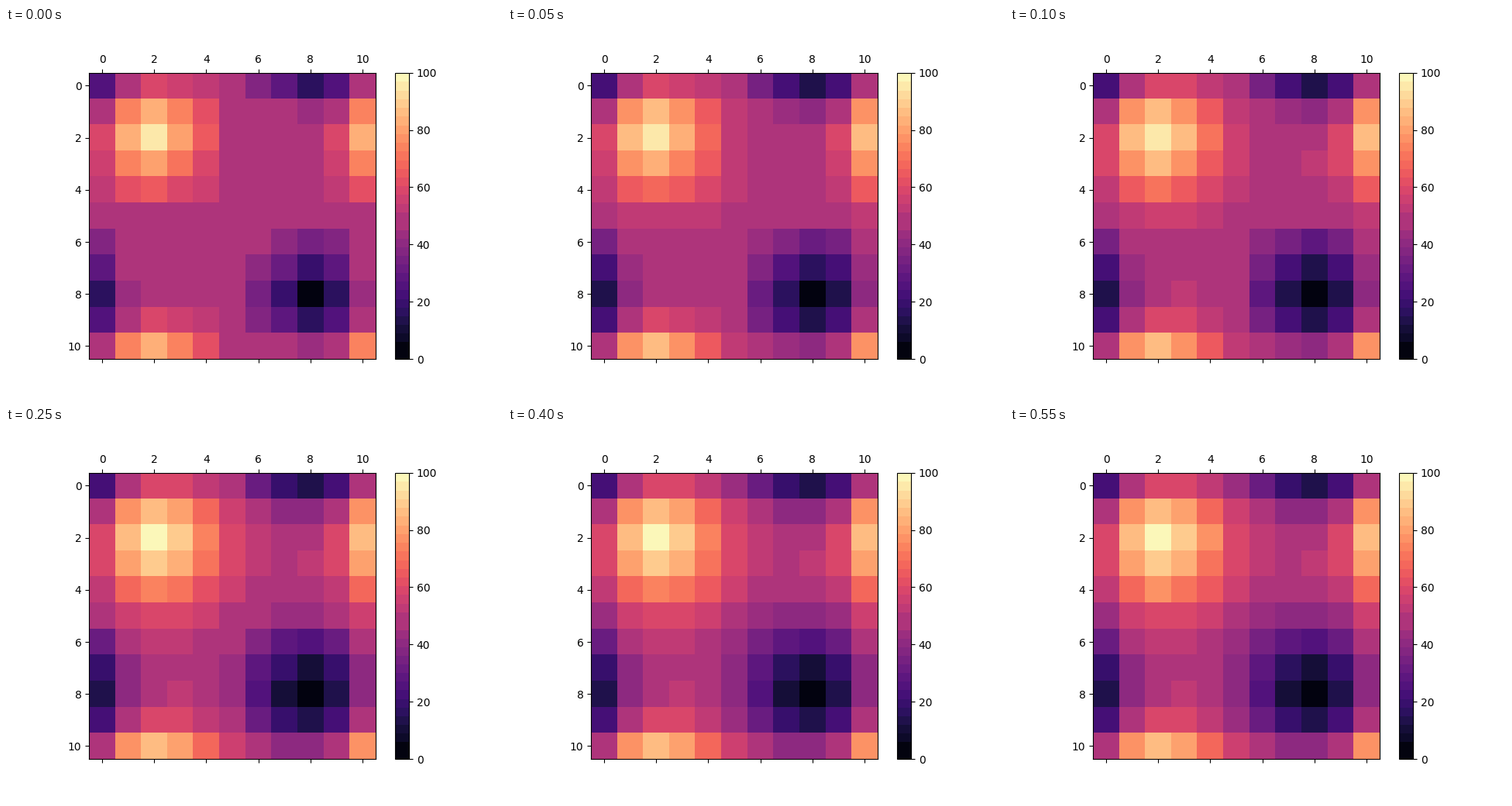
Recreate the animation shown at these times as a matplotlib script. Size 640 px wide and 480 px high, loop 10 s.

```python
import numpy as np
import matplotlib.pyplot as plt
from matplotlib.animation import FuncAnimation
from matplotlib.colors import ListedColormap

INTERVAL = 50
FRAMES = 200
SIZE = 9                  # independent rows; a copied border makes it 11
HOT, COLD = (1, 1), (7, 7)
SEAM_PASS, SEAM_BOUNCE = 0.5, 0.3


def banded_magma(levels=500):
    """Magma in even steps, with one wide band at the bottom and one mid-scale."""
    edges = np.concatenate([[0], np.linspace(6, 45, 14), np.linspace(51.2, 100, 17)])
    values = (np.arange(levels) + 0.5) * 100 / levels
    band = np.searchsorted(edges, values, side="right") - 1
    centres = (edges[:-1] + edges[1:]) / 2
    return ListedColormap(plt.get_cmap("magma")(centres[band] / 100))


def blur(grid):
    """3x3 mean; the seam lets part through and throws part back."""
    border = (SEAM_PASS * np.pad(grid, 1, mode="wrap")
              + SEAM_BOUNCE * np.pad(grid, 1, mode="edge"))
    border[1:-1, 1:-1] = grid
    return sum(border[r:r + SIZE, c:c + SIZE]
               for r in range(3) for c in range(3)) / 9


def simulate():
    """Feed a hot and a cold spot, spread twice per frame, scale to the peak."""
    heat = np.zeros((SIZE, SIZE))
    fields = []
    for frame in range(FRAMES):
        heat[HOT] += 1
        heat[COLD] -= 1
        heat = blur(blur(heat))
        peak = 48 - 3 * 0.73 ** frame
        shown = 50 + peak * heat / heat.max()
        fields.append(np.pad(shown, 1, mode="wrap"))
    return fields


fields = simulate()
fig, ax = plt.subplots(figsize=(6.4, 4.8), dpi=100)
image = ax.matshow(fields[0], cmap=banded_magma(), vmin=0, vmax=100)
fig.colorbar(image)


def update(frame):
    image.set_data(fields[frame])
    return [image]


anim = FuncAnimation(fig, update, frames=FRAMES, interval=INTERVAL,
                     repeat=True, repeat_delay=0)
plt.show()
```
